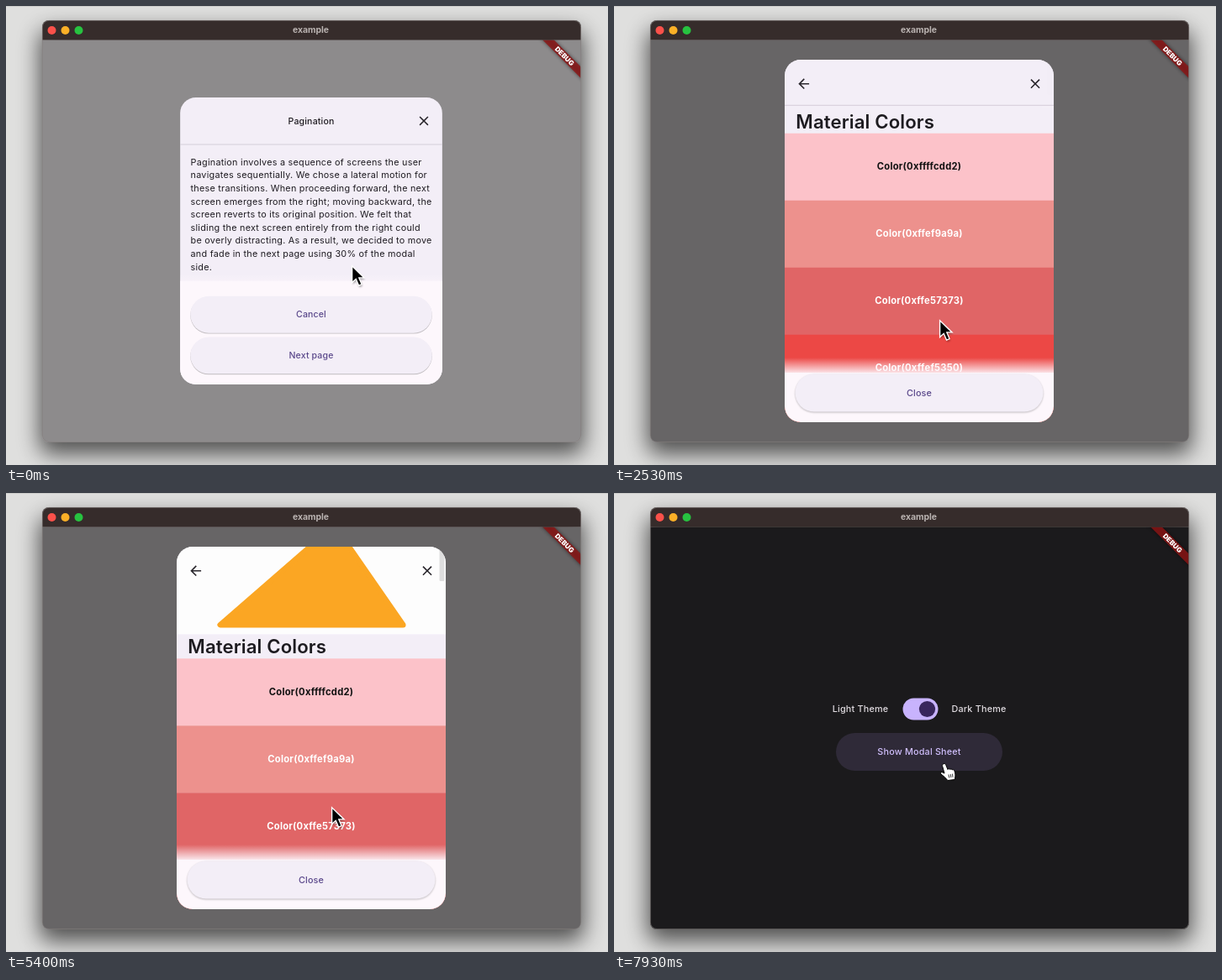
These frames come from a looping animation (716 by 547 pixels, 8000 ms). An HTML page:

```html
<!DOCTYPE html>
<html lang="en">
<head>
<meta charset="utf-8">
<title>Modal sheet demo</title>
<style>
html, body { margin: 0; width: 100%; height: 100%; overflow: hidden; background: #dfdfde; }
svg { display: block; width: 716px; height: 547px; font-family: Inter, Roboto, sans-serif; font-size: 10.8px; font-weight: 500; }
.mid { text-anchor: middle; }
.label { letter-spacing: .16px; }
.body { font-size: 11.1px; font-weight: 400; letter-spacing: .26px; fill: #1f1c22; }
.bar { letter-spacing: .2px; fill: #1f1c22; }
.head { font-size: 22.2px; font-weight: 600; letter-spacing: .12px; fill: #1d1b20; }
.swatch { font-size: 11.2px; font-weight: 700; letter-spacing: .26px; }
.home { letter-spacing: .2px; }
</style>
</head>
<body>
<svg id="stage" viewBox="0 0 716 547"></svg>
<script>
const LOOP = 8000, CX = 363, CY = 280, LEFT = 203, WIDTH = 320;
const OPEN = -166, NEXT = 1048, DISMISS = 6205, THEME = 7300;
const SHORT = 351, TALL = 432;

const copy = [
  'Pagination involves a sequence of screens the user',
  'navigates sequentially. We chose a lateral motion for',
  'these transitions. When proceeding forward, the next',
  'screen emerges from the right; moving backward, the',
  'screen reverts to its original position. We felt that',
  'sliding the next screen entirely from the right could',
  'be overly distracting. As a result, we decided to move',
  'and fade in the next page using 30% of the modal',
  'side.'
];
const swatches = [
  ['ffcdd2', '#fcc2c9'], ['ef9a9a', '#ed918d'], ['e57373', '#e06566'],
  ['ef5350', '#ec4845'], ['f44336', '#ee4030']
];

const text = (x, y, s, cls, attrs = '') => `<text x="${x}" y="${y}" dy=".36em" class="${cls}" ${attrs}>${s}</text>`;
const rect = (x, y, w, h, attrs) => `<rect x="${x}" y="${y}" width="${w}" height="${h}" ${attrs}/>`;
const icon = (x, y, d, attrs = '') => `<path transform="translate(${x - 9.6} ${y - 9.6}) scale(.8)" fill="#2a272d" d="${d}" ${attrs}/>`;
const CLOSE = 'M19 6.41 17.59 5 12 10.59 6.41 5 5 6.41 10.59 12 5 17.59 6.41 19 12 13.41 17.59 19 19 17.59 13.41 12z';
const BACK = 'M20 11H7.83l5.59-5.59L12 4l-8 8 8 8 1.41-1.41L7.83 13H20z';
const ARROW = 'M0 0V18.5L4.3 14.5 7.4 21.7 10.7 20.3 7.7 13.2H13.5Z';
const pill = (y, s) =>
  rect(215.5, y + 1, 295, 45, 'rx="22.5" fill="#000" opacity=".24" filter="url(#soft)"') +
  rect(215.5, y, 295, 45, 'rx="22.5" fill="#f3eef7"') +
  text(CX, y + 22.5, s, 'mid label', 'fill="#59478a"');

const defs = `<defs>
  <filter id="shade" x="-20%" y="-20%" width="140%" height="140%"><feGaussianBlur stdDeviation="13.5"/></filter>
  <filter id="soft" x="-10%" y="-30%" width="120%" height="160%"><feGaussianBlur stdDeviation=".8"/></filter>
  <filter id="blur" x="-20%" y="-80%" width="140%" height="260%"><feGaussianBlur stdDeviation="2"/></filter>
  <linearGradient id="fade" x1="0" y1="0" x2="0" y2="1">
    <stop offset="0" stop-color="#fdf7fc" stop-opacity="0"/><stop offset="1" stop-color="#fdf7fc" stop-opacity=".88"/>
  </linearGradient>
  <clipPath id="win"><rect x="43" y="17" width="641" height="503" rx="8"/></clipPath>
  <clipPath id="content"><rect x="43" y="40.5" width="640.5" height="479"/></clipPath>
  <clipPath id="sheetClip"><rect id="clipBox" x="${LEFT}" width="${WIDTH}" rx="19.2"/></clipPath>
</defs>`;

const homeView = `
  ${text(293, 257.5, 'Light Theme', 'mid home', 'id="lightText"')}
  ${text(434, 257.5, 'Dark Theme', 'mid home', 'id="darkText"')}
  <rect id="track" x="344.3" y="245.3" width="40.4" height="24.4" rx="12.2" stroke-width="1.6"/>
  <circle id="thumb" cy="257.5"/>
  ${rect(264, 287, 198, 45, 'id="homeShade" rx="22.5" fill="#000" filter="url(#soft)"')}
  <rect id="homeButton" x="264" y="286" width="198" height="45" rx="22.5"/>
  ${text(CX, 308.5, 'Show Modal Sheet', 'mid home', 'id="homeLabel"')}`;

const firstPage = {
  body: rect(LEFT, 57, WIDTH, 1, 'fill="#d3cdd8"') +
    copy.map((s, i) => text(215.8, 79 + 16 * i, s, 'body')).join(''),
  foot: rect(LEFT, -135, WIDTH, 9, 'fill="url(#fade)" opacity=".45"') +
    rect(LEFT, -126.5, WIDTH, 127, 'fill="#fdf7fc"') + pill(-108, 'Cancel') + pill(-58, 'Next page'),
  nav: text(CX, 28.5, 'Pagination', 'mid bar') + icon(500.5, 28.7, CLOSE)
};

const secondPage = {
  body: `<g id="hero">
      ${rect(LEFT, 0, WIDTH, 160, 'fill="#fdfdfd"')}
      <g id="art">
        <circle cx="280.5" cy="24.5" r="22.5" fill="#f4706a"/>
        <path d="M392 28 249 152.5H478z" fill="#fba623" stroke="#fba623" stroke-width="7" stroke-linejoin="round"/>
      </g>
    </g>
    <g id="list">
      ${text(216.3, 175, 'Material Colors', 'head')}
      ${swatches.map(([hex, fill], i) =>
        rect(LEFT, 189 + 80 * i, WIDTH, 80.3, `fill="${fill}"`) +
        text(CX, 228.5 + 80 * i, `Color(0xff${hex})`, 'mid swatch', `fill="${i ? '#fff' : '#111'}"`)).join('')}
    </g>
    ${rect(515.5, 0, 6, 40, 'id="scrollbar" rx="1.5" fill="#000"')}
    <g id="topBar">
      ${rect(LEFT, -4, WIDTH, 60.5, 'fill="#f3eef7"')}
      ${rect(LEFT, 55.8, WIDTH, 1, 'fill="#d3cbd8"')}
    </g>
    ${text(CX, 28.8, 'Material Colors', 'mid bar', 'id="barTitle"')}`,
  foot: rect(LEFT, -77, WIDTH, 18, 'fill="url(#fade)"') +
    rect(LEFT, -59, WIDTH, 59.5, 'fill="#fdf7fc"') + pill(-57.5, 'Close'),
  nav: icon(225.7, 28.7, BACK) + icon(501, 28.7, CLOSE)
};

const pageMarkup = (p, n) => ['body', 'foot', 'nav'].map(k => `<g id="${k}${n}">${p[k]}</g>`).join('');

const stage = document.getElementById('stage');
stage.innerHTML = defs + `
  ${rect(0, 0, 716, 547, 'fill="#dfdfde"')}
  ${rect(0, 0, 716, 1, 'fill="#cdcdcb"')}
  ${rect(40, 29, 647, 505, 'rx="12" fill="#000" opacity=".64" filter="url(#shade)"')}
  <g clip-path="url(#win)">
    <rect id="page" x="43" y="40.5" width="641" height="480"/>
    ${homeView}
    <rect id="barrier" x="43" y="40.5" width="641" height="480" fill="#000"/>
    <g id="dialog"><g clip-path="url(#sheetClip)">
      <rect id="sheet" x="${LEFT}" width="${WIDTH}" fill="#f3eef7"/>
      ${pageMarkup(firstPage, 1)}
      ${pageMarkup(secondPage, 2)}
    </g></g>
    <g clip-path="url(#content)"><g transform="translate(683.5 40.5) rotate(45)">
      ${rect(-36, 22.4, 72, 9.6, 'fill="#000" opacity=".5" filter="url(#blur)"')}
      ${rect(-36, 22.4, 72, 9.6, 'fill="#8e1515" opacity=".82"')}
      ${text(0, 27.1, 'DEBUG', 'mid', 'fill="#fff" style="font-size:8.2px;font-weight:900"')}
    </g></g>
    ${rect(43, 17, 641, 23.5, 'fill="#362c2b"')}
    ${['#fb514a', '#fcb027', '#27c340'].map((c, i) => `<circle cx="${54.5 + 16 * i}" cy="29" r="5" fill="${c}"/>`).join('')}
    ${text(362.5, 28.5, 'example', 'mid', 'fill="#bab3b1" style="font-size:10.4px;font-weight:700"')}
  </g>
  ${rect(43.4, 17.4, 640.2, 502.2, 'rx="7.6" fill="none" stroke="#85807e" stroke-width=".8" opacity=".8"')}
  <g id="arrow">
    <path d="${ARROW}" transform="translate(1.5 3) scale(1.07)" opacity=".35" filter="url(#soft)"/>
    <path d="${ARROW}" transform="translate(.6 .8) scale(1.07)" stroke="#fff" stroke-width="1.3"/>
  </g>
  <g id="hand" fill="#fff" stroke="#000" stroke-width="1" stroke-linejoin="round">
    <path d="M5 1.2C6.4.6 7.3 1.5 7.8 2.8L10 8C10.6 6.8 12 6.9 12.6 8 13.4 7 14.8 7.3 15.2 8.5 16.2 7.8 17.4 8.2 17.9 9.6 19 12.5 19.2 15 18.6 17.8L18.4 20 9.8 21C8 18.5 5 15.8 2 13.6.6 12.2 2 10.8 3.6 11.4L6 12.6 3.6 4C3.2 2.6 3.8 1.6 5 1.2Z"/>
    <path d="M10.9 14l.9 4M13.2 13.6l.7 4M15.5 13.2l.5 4" fill="none" stroke-width=".8"/>
  </g>`;

const el = {};
stage.querySelectorAll('[id]').forEach(n => { el[n.id] = n; });

const set = (id, attrs) => { for (const k in attrs) el[id].setAttribute(k, attrs[k]); };
const clamp = v => Math.min(1, Math.max(0, v));
const lerp = (a, b, u) => a + (b - a) * u;
const smooth = u => { u = clamp(u); return u * u * (3 - 2 * u); };
const mix = (a, b, u) => `rgb(${a.map((v, i) => Math.round(lerp(v, b[i], u)))})`;

// cubic-bezier(.4, 0, .2, 1)
function standard(x) {
  x = clamp(x);
  let lo = 0, hi = 1;
  for (let i = 0; i < 24; i++) {
    const s = (lo + hi) / 2, r = 1 - s;
    if (1.2 * r * r * s + .6 * r * s * s + s * s * s < x) lo = s; else hi = s;
  }
  return smooth(lo);
}

const pointer = [
  [0, 411, 309], [300, 411, 309], [850, 387, 407], [1500, 387, 407], [1850, 387, 374],
  [5780, 387, 374], [6120, 550, 347], [6500, 550, 347], [7080, 364, 257], [7480, 364, 257], [7900, 392, 322]
];
function pointerAt(t) {
  const i = pointer.findIndex(p => p[0] > t);
  if (i < 0) return pointer[pointer.length - 1].slice(1);
  const [a, b] = [pointer[i - 1], pointer[i]];
  const u = smooth((t - a[0]) / (b[0] - a[0]));
  return [lerp(a[1], b[1], u), lerp(a[2], b[2], u)];
}

const scrollAt = t => 135.5 * (smooth((t - 1950) / 865) - smooth((t - 4950) / 806));
const flash = (t, from, to) => clamp((t - from) / 100) * (1 - clamp((t - to - 600) / 300));

function placePage(n, dx, top, alpha) {
  set('body' + n, { transform: `translate(${dx} ${top})`, opacity: alpha.body });
  set('nav' + n, { transform: `translate(0 ${top})`, opacity: alpha.nav });
  set('foot' + n, { transform: `translate(0 ${2 * CY - top})`, opacity: alpha.foot });
}

function drawDialog(t) {
  const raw = t < DISMISS ? clamp((t - OPEN) / 350) : clamp(1 - (t - DISMISS) / 234);
  const p = standard(raw), scale = .9 + .1 * p;
  set('barrier', { opacity: .594 * p });
  set('dialog', {
    transform: `translate(${CX} ${CY}) scale(${scale}) translate(${-CX} ${-CY})`,
    opacity: clamp(raw * 6)
  });

  const forward = t >= NEXT && t < DISMISS, dir = forward ? 1 : -1;
  const e = t < NEXT ? 1000 : t - (forward ? NEXT : DISMISS);
  const grow = standard(e / 300), slide = standard(e / 350);
  const height = forward ? lerp(SHORT, TALL, grow) : lerp(TALL, SHORT, grow);
  const top = CY - height / 2, gone = 1 - clamp(e / 100);
  set('clipBox', { y: top, height });
  set('sheet', { y: top, height });
  placePage(forward ? 2 : 1, dir * 96 * (1 - slide), top,
    { body: clamp((e - 150) / 200), nav: clamp((e - 100) / 200), foot: clamp((e - 120) / 180) });
  placePage(forward ? 1 : 2, -dir * 96 * slide, top, { body: gone, nav: gone, foot: gone });

  const y = scrollAt(t), bar = clamp((y - 84) / 18), title = clamp((y - 112) / 16);
  set('hero', { transform: `translate(0 ${-y})`, opacity: 1 - bar });
  set('art', { transform: `translate(${CX} 80) scale(${1 - .0009 * y}) translate(${-CX} -80)` });
  set('list', { transform: `translate(0 ${-y})` });
  set('topBar', { opacity: bar, transform: `translate(0 ${-2 + 2 * title})` });
  set('barTitle', { opacity: title });
  set('scrollbar', { y: .02 * y, opacity: .12 * Math.max(flash(t, 1950, 2815), flash(t, 4950, 5756)) });
}

function drawHome(t) {
  const d = clamp((t - THEME) / 200), s = standard((t - THEME) / 300);
  const ink = mix([29, 27, 32], [226, 221, 226], d);
  set('page', { fill: mix([253, 248, 251], [27, 26, 28], d) });
  set('lightText', { fill: ink });
  set('darkText', { fill: ink });
  set('track', { fill: mix([231, 224, 236], [200, 179, 253], s), stroke: mix([121, 116, 126], [200, 179, 253], s) });
  set('thumb', { cx: lerp(356.5, 372.5, s), r: lerp(6.4, 9.6, s), fill: mix([121, 116, 126], [56, 38, 92], s) });
  set('homeShade', { opacity: .28 * (1 - d) });
  set('homeButton', { fill: mix([243, 238, 247], [47, 42, 56], d) });
  set('homeLabel', { fill: mix([89, 71, 138], [207, 190, 251], d) });
}

function drawPointer(t) {
  const [x, y] = pointerAt(t);
  const over = (l, tp, r, b) => x > l && x < r && y > tp && y < b;
  const hand = t < NEXT + 120 ? over(215, 347, 511, 443)
    : t > DISMISS + 234 && (over(343, 244, 386, 271) || over(264, 286, 462, 331));
  set('arrow', { transform: `translate(${x} ${y})`, visibility: hand ? 'hidden' : 'visible' });
  set('hand', { transform: `translate(${x - 5} ${y - .5})`, visibility: hand ? 'visible' : 'hidden' });
}

function draw(t) {
  drawHome(t);
  drawDialog(t);
  drawPointer(t);
}

const start = performance.now();
function tick() {
  draw((performance.now() - start) % LOOP);
  requestAnimationFrame(tick);
}
tick();
</script>
</body>
</html>
```
